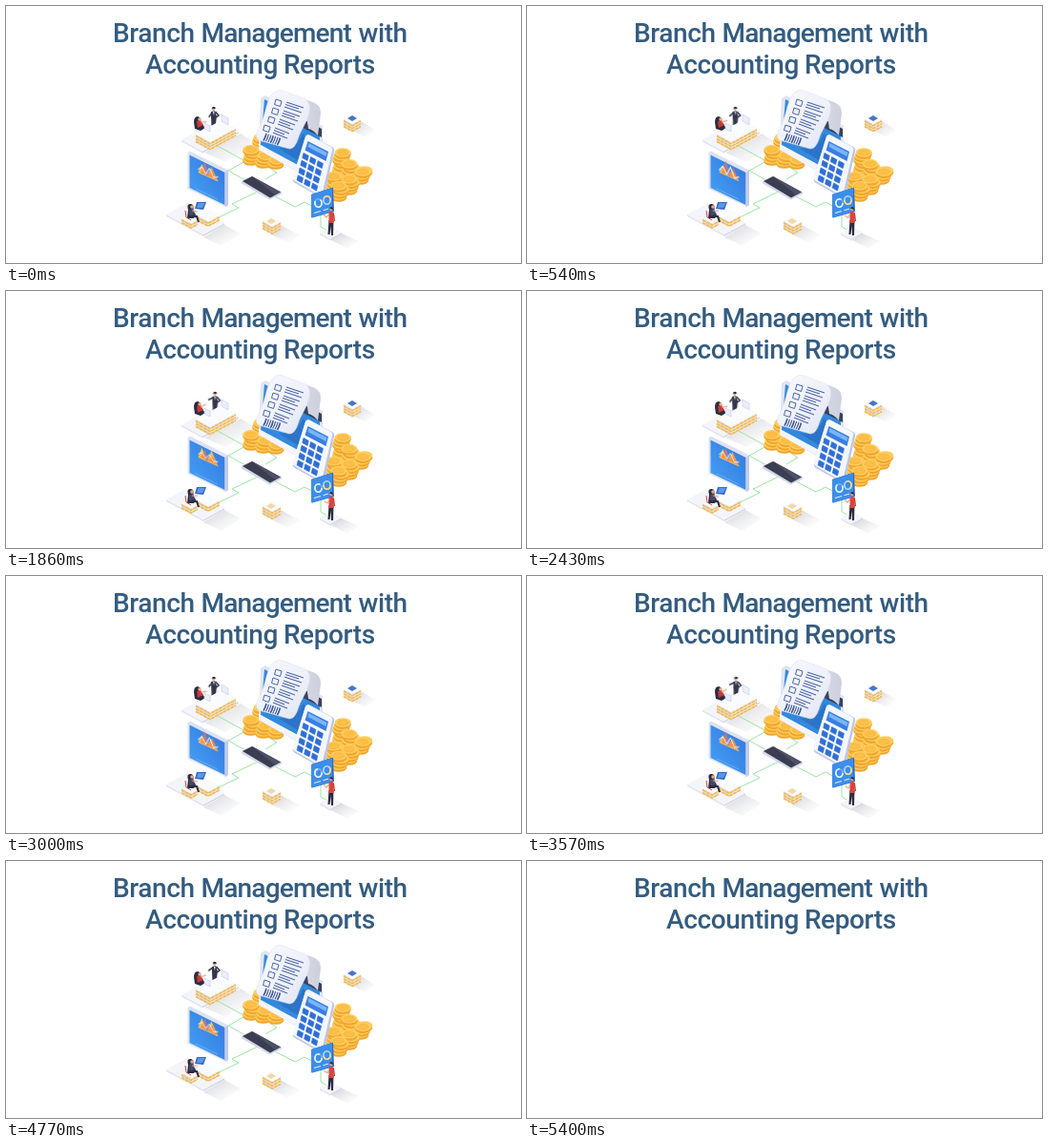
Write an HTML page that moves like this. It is 540 px wide and 270 px high and loops after 5430 ms.

```html
<!DOCTYPE html>
<html lang="en">
<head>
<meta charset="utf-8">
<title>Branch Management with Accounting Reports</title>
<style>
  html, body { margin: 0; width: 100%; height: 100%; overflow: hidden; background: #fff; }
  svg { display: block; width: 540px; height: 270px; }
  .title { font: 500 28px Roboto, "Open Sans", sans-serif; fill: #345c80; letter-spacing: -.4px; }
  .tight { letter-spacing: -.8px; }

  #scene { animation: fade 5.43s linear infinite; }
  .move { animation: 2.715s ease-in-out infinite; transform-box: fill-box; }
  .peak { transform-origin: 50% 100%; }
  .p1 { animation-name: peak1; }
  .p2 { animation-name: peak2; }
  .trend { animation-name: trend; transform-origin: 50% 60%; }
  .host { animation-name: step; }
  .wave { animation-name: wave; transform-origin: 0 100%; }
  .reach { animation-name: reach; transform-origin: 100% 0; }
  .point { animation-name: point; transform-origin: 100% 0; }
  .type { animation-name: type; transform-origin: 0 0; animation-duration: 1.3575s; }
  .ring { animation-name: ring; animation-duration: 1.3575s; }
  .late { animation-name: ringLate; }

  @keyframes fade { 0%, 94.5% { opacity: 1 } 99.4%, 100% { opacity: 0 } }
  @keyframes peak1 { 0%, 100% { transform: scaleY(.9) } 20% { transform: scaleY(.7) } 55% { transform: scaleY(1.05) } }
  @keyframes peak2 { 0%, 100% { transform: none } 20% { transform: scaleY(1.15) } 55% { transform: scaleY(.75) } }
  @keyframes trend { 0%, 100% { transform: none } 20% { transform: scaleY(1.2) } 55% { transform: scaleY(.6) } }
  @keyframes step { 0%, 100% { transform: none } 50% { transform: translateX(2px) } }
  @keyframes wave { 0%, 100% { transform: rotate(35deg) } 50% { transform: none } }
  @keyframes reach { 0%, 100% { transform: rotate(-25deg) } 50% { transform: rotate(20deg) } }
  @keyframes point { 0%, 100% { transform: none } 50% { transform: rotate(-28deg) } }
  @keyframes type { 0%, 100% { transform: none } 50% { transform: rotate(-7deg) } }
  @keyframes ring { 0%, 100% { stroke-dashoffset: 6 } 40% { stroke-dashoffset: 0 } }
  @keyframes ringLate { 0%, 100% { stroke-dashoffset: 11 } 40% { stroke-dashoffset: 0 } }
</style>
</head>
<body>
<svg viewBox="0 0 540 270">
  <defs>
    <linearGradient id="shade" x1="0" y1="0" x2="1" y2="1">
      <stop offset=".25" stop-color="#9a9ca8" stop-opacity=".3"/>
      <stop offset=".9" stop-color="#b9bac4" stop-opacity="0"/>
    </linearGradient>
    <linearGradient id="blue" x1="1" y1="0" x2="0" y2="1">
      <stop offset="0" stop-color="#3574dd"/>
      <stop offset="1" stop-color="#43a4f6"/>
    </linearGradient>
    <linearGradient id="paper" x1="0" y1="0" x2="1" y2="1">
      <stop offset="0" stop-color="#f8f9fe"/>
      <stop offset=".6" stop-color="#eef1fb"/>
      <stop offset="1" stop-color="#dde1f0"/>
    </linearGradient>
    <linearGradient id="curl">
      <stop offset="0" stop-color="#e3e6f0"/>
      <stop offset="1" stop-color="#cdd0dc"/>
    </linearGradient>
  </defs>

  <text class="title" y="38"><tspan x="112">Branch</tspan> <tspan class="tight" x="204.500">Management</tspan> <tspan x="369.500">with</tspan></text>
  <text class="title" y="70.500" x="146">Accounting <tspan x="291">Reports</tspan></text>

  <g id="scene">
    <g fill="url(#shade)">
      <path d="M208 154L246 134L262 144L230 164Z"/>
      <path d="M207 243L229 230L246 239L226 252Z"/>
      <path d="M278 240L288 230L308 241L296 249Z"/>
      <path d="M363 131L372 121L387 130L377 138Z"/>
      <path d="M341 246L352 239L370 247L358 255Z"/>
    </g>

    <g fill="none" stroke="#9be4a4" stroke-width="1">
      <path d="M220 146L251 163L233 173L251 183"/>
      <path d="M264 195L237 208L244 212L221 223"/>
      <path d="M280 199L303 211L313 206L330 215V232L337 236"/>
      <path d="M272 182L284 175L275 169"/>
    </g>

    <!-- reception desk -->
    <g id="reception"></g>
    <g>
      <path d="M197 122Q197 116 201 116Q205 117 204 122L209 128L204 131L198 129Z" fill="#2b2c3f"/>
      <path d="M200 121L204 120L207 125L201 128Z" fill="#c93a35"/>
      <circle cx="203" cy="119" r="1.700" fill="#e9ad91"/>
      <path class="move wave" d="M204 122L209 118" stroke="#e4a184" stroke-width="1.200"/>
      <g class="move host">
        <path d="M215 111L219 110L221 116L219.500 126H215.500L215 117Z" fill="#34364a"/>
        <path d="M217 111L218.500 110.500L218 115Z" fill="#fff"/>
        <path class="move reach" d="M216 112L211 115" stroke="#34364a" stroke-width="1.500"/>
        <path d="M219.500 111L223 115L220.500 117" fill="none" stroke="#34364a" stroke-width="1.500"/>
        <circle cx="217.500" cy="108" r="1.800" fill="#dd9c7e"/>
        <path d="M215.600 107.500Q217 104.500 219.500 106.500V108Z" fill="#202235"/>
      </g>
    </g>
    <g id="counter"></g>
    <path d="M208 123L214 126V132L208 129ZM226 114L233 118V125L226 121Z" fill="#e9eefb" stroke="#c3cce8" stroke-width=".6"/>

    <!-- wall screen -->
    <path d="M190.500 154L193 152.500L233 172.500V209L231 211L190.500 192Z" fill="#dde2f4"/>
    <path d="M192.500 156.500L229.500 175V209L192.500 191Z" fill="url(#blue)"/>
    <path d="M229.500 175L233 172.500V209L229.500 211Z" fill="#c3cbe8"/>
    <g transform="matrix(1 .45 0 1 201.500 172)">
      <path class="move peak p1" d="M0 3L4 -9L9 3L14 -10L21 3Z" fill="#ffc34f"/>
      <path class="move peak p2" d="M2 2L7 -11L11 0L15 -8L20 2Z" fill="#ee7a52" fill-opacity=".65"/>
      <path class="move trend" d="M0 0L4 -5L8 1L12 -7L16 1L21 -2" fill="none" stroke="#fff" stroke-width=".9"/>
    </g>
    <path d="M199 192L222 203" stroke="#78b7fb" stroke-width=".7"/>

    <!-- coins behind the monitor -->
    <g id="coinsLeft"></g>

    <!-- monitor -->
    <path d="M267 97L272 94L332 126V166L305 174L265 151Z" fill="#dfe4f4"/>
    <path d="M271 98L329 129V165L305 167L267 146Z" fill="#3389dc"/>
    <path d="M294 110L331 129V138L294 119Z" fill="#39415f"/>
    <path d="M265 145L306 167V174L265 151Z" fill="#f3f5fd"/>
    <path d="M285 149Q305 152 311 134L318 140L306 162Z" fill="#2867bd" opacity=".6"/>

    <!-- receipt -->
    <path d="M286 89L322 101Q330 104 330 113L327 136Q322 130 317 129L314 108Z" fill="url(#curl)"/>
    <path d="M282 90Q285 87 290 89L314 98Q320 102 318 112C315 124 309 130 306 140Q303 150 297 150L265 141Q261 139 263 133C267 124 270 119 273 106Q276 94 282 90Z" fill="url(#paper)" stroke="#dadfef" stroke-width=".5"/>
    <g id="checks" stroke="#4d66a8" fill="none"></g>
    <g id="bars" stroke="#42599c"></g>

    <g id="coinsRight"></g>

    <!-- calculator -->
    <path d="M314 137Q316 134 319 136L342 148Q345 150 344 153L334 198Q332 203 328 200L303 186Q300 184 301 181Z" fill="#bcc6e6"/>
    <path d="M314 137Q316 134 319 136L340 147.500Q343 149 342 152L332 195Q330 200 327 198L303 184Q300 182 301 179Z" fill="#f5f7fe"/>
    <path d="M316.500 142L338 153L335.500 163L313.500 151.500Z" fill="#3a7ee2"/>
    <path d="M317.500 144L336.500 154L335.500 158L316.500 148Z" fill="#79b6fa"/>
    <g id="keys" fill="#2f6fd6"></g>

    <!-- phone -->
    <path d="M247 184L258 178.500L289 195.500V197.500L276.500 203.500L247 186.500Z" fill="#d3d8ea"/>
    <path d="M248 184L258 179L288 195.500L277 201.500Z" fill="#3b3d50"/>
    <path d="M258 179L288 195.500L282 198.500Z" fill="#4d5066"/>

    <!-- office desk -->
    <g id="office"></g>
    <g>
      <path d="M200 206L210 206L207 214L198 213Z" fill="#3467c4"/>
      <path d="M201.500 207H208.500L206 212H200Z" fill="#5b98ec"/>
      <path d="M191 214Q189 207 194 208Q198 209 196 215L199 219L197 223H190Z" fill="#2a2b40"/>
      <path d="M192 214L196 212L198 219L192 221Z" fill="#444966"/>
      <circle cx="195" cy="211" r="1.800" fill="#e8aa8f"/>
      <path class="move type" d="M195 215L201 216" stroke="#e0a085" stroke-width="1.200"/>
      <path d="M192 221L200 221L202 227" fill="none" stroke="#2b2e45" stroke-width="2"/>
      <path d="M188 215L189 222L194 225" fill="none" stroke="#c94740" stroke-width="1"/>
    </g>

    <g id="boxes"></g>

    <!-- presenter -->
    <path d="M320 198L343 190.500L344 216L321 222.500Z" fill="#2c69c9"/>
    <path d="M320 198L342 191V216L320 222.500Z" fill="#3d8ee9"/>
    <g fill="none" stroke-width="1.600">
      <ellipse cx="327.500" cy="207" rx="3.600" ry="4.200" stroke="#72b5f7"/>
      <ellipse class="move ring" cx="327.500" cy="207" rx="3.600" ry="4.200" stroke="#e9f5ff" stroke-dasharray="20 6"/>
      <ellipse cx="336.500" cy="204" rx="3.600" ry="4.200" stroke="#b8dcfb"/>
      <ellipse class="move ring late" cx="336.500" cy="204" rx="3.600" ry="4.200" stroke="#ffd779" stroke-dasharray="12 13"/>
    </g>
    <path d="M323 217.500L330 215.500M332.500 214.800L338 213" stroke="#d9ebff" stroke-width="1.100"/>
    <g>
      <path d="M338.500 225H343.500L343 241H341L340.500 231L339.500 240H337.500Z" fill="#2a2c41"/>
      <path d="M338.500 217Q341 214.500 344 217.500L343.500 228H338.500Z" fill="#da453c"/>
      <path class="move point" d="M339 218L336 222L333 219" fill="none" stroke="#e3a184" stroke-width="1.200"/>
      <path d="M343.500 218.500L344.500 226" stroke="#c23a34" stroke-width="1.200"/>
      <circle cx="341" cy="213.500" r="1.800" fill="#dd9d7e"/>
      <path d="M339.200 212.500Q341 209.500 343 212.500V214Z" fill="#27283a"/>
    </g>
  </g>
</svg>
<script>
  const K = 0.54;
  const add = (id, markup) => { document.getElementById(id).innerHTML += markup; };
  const poly = (points, fill) => `<path d="M${points.join('L')}Z" fill="${fill}"/>`;

  // Isometric slab: (x, y) is the far corner, a runs right, b runs left, h goes down.
  function slab(x, y, a, b, h, [top, left, right] = ['#f4f5fa', '#e2e4ef', '#d5d9e8']) {
    const T = [x, y], R = [x + a, y + a * K], L = [x - b, y + b * K];
    const B = [x + a - b, y + (a + b) * K];
    const low = ([px, py]) => [px, py + h];
    return poly([L, B, low(B), low(L)], left) +
           poly([B, R, low(R), low(B)], right) +
           poly([T, R, B, L], top);
  }

  // Rows of orange bricks on both visible faces of a slab.
  function bricks(x, y, a, b, h) {
    const bx = x + a - b, by = y + (a + b) * K;
    let d = '';
    for (let row = 2; row < h; row += 2.9) {
      d += `M${x - b} ${y + b * K + row}L${bx} ${by + row}L${x + a} ${y + a * K + row}`;
    }
    return `<path d="${d}" fill="none" stroke="#f3bc57" stroke-width="1.8" stroke-dasharray="4 .6"/>`;
  }

  const block = (...p) => slab(...p, ['#fafbff', '#dfe4f3', '#e9edf8']) + bricks(...p);

  function stack(x, base, n) {
    let out = '';
    for (let i = 0; i < n; i++) {
      const cx = x + (i % 3 - 1) * 1.2, cy = base - i * 3.4;
      out += `<ellipse cx="${cx}" cy="${cy + 2}" rx="8.6" ry="4.8" fill="#f1a52c"/>` +
             `<ellipse cx="${cx}" cy="${cy}" rx="8.6" ry="4.8" fill="#ffcd5e"/>` +
             `<ellipse cx="${cx}" cy="${cy}" rx="5.8" ry="3" fill="#fdbf45" stroke="#f2ad3a" stroke-width=".5"/>`;
    }
    return out;
  }
  const heap = list => list.map(s => stack(...s)).join('');

  add('reception', slab(222, 120, 22, 38, 2));
  add('counter', block(226, 120, 15, 27, 9));
  add('office', slab(190, 207, 39, 22, 2) + block(204, 209, 20, 12, 5) + block(191, 219, 10, 7, 5));
  add('boxes', block(363, 114, 9, 9, 8) + block(278, 221, 10, 9, 8.5) + slab(341, 232, 11, 12, 2) +
    poly([[363, 115], [368, 118], [363, 121], [358, 118]], '#4774cb') +
    poly([[278, 223], [283, 226], [278, 229], [273, 226]], '#f2d9a4'));

  add('coinsLeft', heap([[268, 152, 5], [258, 161, 4], [271, 164, 3], [284, 165, 2]]));
  add('coinsRight', heap([[352, 171, 6], [361, 176, 4], [377, 173, 1], [373, 181, 3],
    [345, 189, 4], [361, 192, 4], [350, 199, 4]]));

  // Checklist rows follow the curl of the paper.
  const rows = [[286, 98], [283, 107], [279, 116], [274, 125]];
  rows.forEach(([x, y], i) => {
    add('checks', `<path d="M${x - 3} ${y}l6 2l-1.500 5.500l-6 -2z" stroke-width="1"/>` +
      `<path d="M${x + 8} ${y + 3}l${18 - i} 6M${x + 7} ${y + 5.5}l${14 - i} 4.600M${x + 6} ${y + 8}l${18 - i} 6" stroke-width="1.050"/>`);
  });

  for (let i = 0; i < 7; i++) {
    const x = 273 + i * 2.4, y = 134 + i * 0.75;
    add('bars', `<path d="M${x} ${y}q-.8 4 -3 7.500" stroke-width="${i % 3 ? 1.1 : 1.6}"/>`);
  }

  for (let r = 0; r < 4; r++) for (let c = 0; c < 3; c++) {
    const x = 312 + c * 7.6 - r * 1.9, y = 154.5 + c * 4.1 + r * 7.8;
    add('keys', `<path d="M${x} ${y}l5.200 2.800l-1.200 5l-5.200 -2.800z" stroke="#2f6fd6" stroke-width=".8" stroke-linejoin="round"/>`);
  }
</script>
</body>
</html>
```
